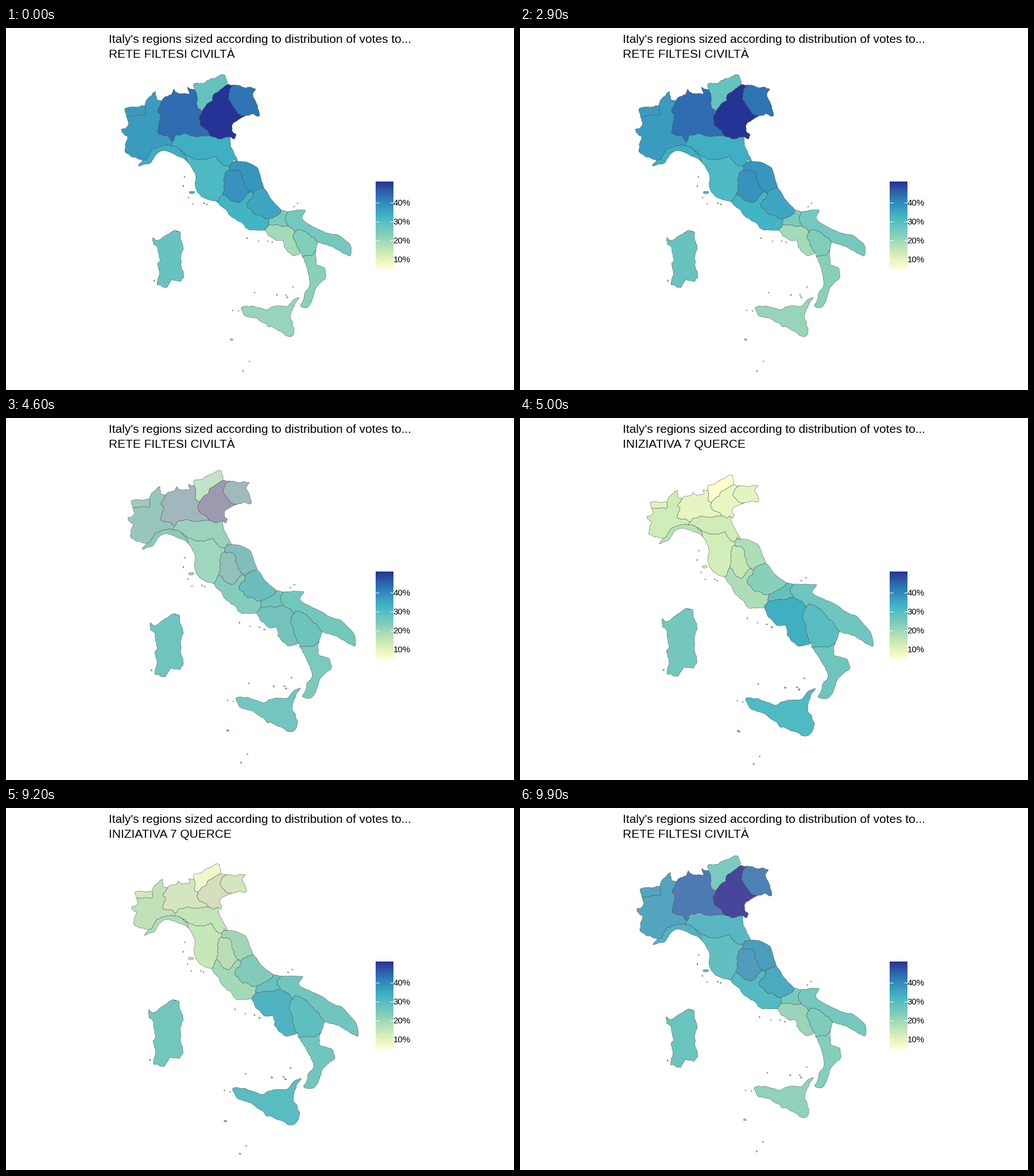
Animation, 885 px wide and 632 px high, one loop 10000 ms. Source, as a matplotlib script:

```python
import matplotlib.pyplot as plt
import numpy as np
from matplotlib.animation import FuncAnimation
from matplotlib.collections import PolyCollection
from matplotlib.colors import to_rgb

W, H, DPI = 885, 632, 100
LOW, HIGH = 5.2, 51.0
TITLE = "Italy's regions sized according to distribution of votes to..."
PARTIES = ("RETE FILTESI CIVILTÀ", "INIZIATIVA 7 QUERCE")
rng = np.random.default_rng(11)

# vote share of the two parties, in percent
SHARES = dict(
    vda=(37.2, 10.4), pie=(37.1, 13.3), lom=(44, 9.3), tre=(27.8, 5.2),
    ven=(51, 8.9), fri=(43.2, 9.6), lig=(34.2, 16.4), emi=(33.8, 12.9),
    tos=(31.5, 12.7), umb=(38.4, 14.6), mar=(38, 18), laz=(32.8, 17.9),
    abr=(35.4, 22.4), mol=(24.3, 28.5), cam=(19.2, 33.9), pug=(25.3, 26.3),
    bas=(23.3, 29.8), cal=(22.6, 26.7), sic=(20.8, 31.2), sar=(27.6, 25.7))

# points where borders meet
NODES = dict(
    P1=(242, 136), P2=(211, 157), P3=(272, 128), P4=(290, 199), P5=(288, 206),
    P6=(246, 229), L1=(304, 214), L2=(316, 234), E1=(357, 189), E2=(391, 190),
    E3=(389, 241), E4=(404, 233), T1=(329, 107), T2=(342, 146), T3=(386, 99),
    V1=(397, 99), V2=(417, 153), U1=(389, 248), U2=(378, 291), U3=(427, 285),
    M1=(430, 289), M2=(449, 279), Z1=(367, 303), Z2=(458, 334), Z3=(458, 344),
    Z4=(452, 353), O1=(480, 318), O2=(490, 321), O3=(491, 346), C1=(503, 357),
    C2=(514, 392), B1=(544, 374), B2=(540, 388), B3=(516, 399))

# pulls on the map sheet: x, y, dx, dy
ALPS = [(207, 142, 20, 6), (242, 136, 14, 11), (259, 111, 14, 15), (201, 177, 20, -5),
        (230, 241, 12, -21), (275, 215, 5, -22), (290, 199, 6, -17), (291, 106, 10, 23),
        (342, 146, -8, 2), (357, 189, -4, -18), (380, 82, -11, 18), (397, 99, -15, 19),
        (442, 152, -26, -7), (399, 194, -27, -19)]
SPINE = [(316, 234, 2, -27), (404, 233, -20, -22), (367, 303, -10, -25), (378, 291, -12, -30),
         (427, 285, -24, -23), (449, 279, -21, -26), (452, 353, -26, -22), (458, 334, -25, -25),
         (480, 318, -15, -30), (521, 318, -5, -27), (516, 331, -7, -27), (491, 346, -15, -33),
         (503, 357, -5, -26), (548, 352, 3, -28), (600, 380, 11, -4), (544, 374, 13, -1),
         (514, 392, -7, 1), (479, 370, -21, -9), (524, 417, -5, -2), (557, 436, 18, 1),
         (529, 441, 6, 2), (513, 484, 6, 2)]
SEA = [(410, 489, -17, 2), (511, 471, 4, 2), (502, 525, 11, 8), (498, 538, 6, 15),
       (447, 513, -7, 13), (465, 522, -2, 19), (294, 353, -4, -21), (256, 378, -9, -13),
       (309, 385, 0, -19), (303, 443, -2, -6), (266, 405, -9, -6), (502, 312, -12, -28),
       (393, 544, -12, 3), (413, 599, -6, 5)]


# ---- colour in Lab ----
M = np.array([[.4124, .3576, .1805], [.2126, .7152, .0722], [.0193, .1192, .9505]])
WHITE = M.sum(axis=1)


def rgb_to_lab(rgb):
    rgb = np.asarray(rgb, float)
    lin = np.where(rgb > .04045, ((rgb + .055) / 1.055) ** 2.4, rgb / 12.92)
    x = lin @ M.T / WHITE
    f = np.where(x > .008856, np.cbrt(x), 7.787 * x + 16 / 116)
    return np.stack([116 * f[..., 1] - 16, 500 * (f[..., 0] - f[..., 1]),
                     200 * (f[..., 1] - f[..., 2])], axis=-1)


def lab_to_rgb(lab):
    fy = (lab[..., 0] + 16) / 116
    f = np.stack([fy + lab[..., 1] / 500, fy, fy - lab[..., 2] / 200], axis=-1)
    x = np.where(f > .2069, f ** 3, (f - 16 / 116) / 7.787) * WHITE
    lin = np.clip(x @ np.linalg.inv(M).T, 0, 1)
    return np.where(lin > .0031308, 1.055 * lin ** (1 / 2.4) - .055, 12.92 * lin)


STOPS = rgb_to_lab([to_rgb(c) for c in (
    "#ffffcc", "#c7e9b4", "#7fcdbb", "#41b6c4", "#2c7fb8", "#253494")])


def scale_lab(share):
    t = (np.asarray(share, float) - LOW) / (HIGH - LOW) * 5
    return np.stack([np.interp(t, range(6), STOPS[:, k]) for k in range(3)], axis=-1)


# ---- thin-plate warp that follows the pulls ----
def kernel(p, q):
    r2 = ((p[:, None] - q[None]) ** 2).sum(axis=-1)
    return r2 * np.log(r2 + 1e-9)


def affine(p):
    return np.column_stack([np.ones(len(p)), p])


pulls = np.array(ALPS + SPINE + SEA, float)
pins, shift = pulls[:, :2], pulls[:, 2:]
A = affine(pins)
system = np.block([[kernel(pins, pins), A], [A.T, np.zeros((3, 3))]])
weights = np.linalg.solve(system, np.vstack([shift, np.zeros((3, 2))]))


def warp(p):
    return p + np.hstack([kernel(p, pins), affine(p)]) @ weights


# ---- borders and coasts ----
def rough(pts, amp):
    """Smooth curve through the points with a seeded fractal wobble."""
    p = np.array(pts, float)
    closed = np.allclose(p[0], p[-1])
    for _ in range(4):
        q = np.vstack([p[-2] if closed else p[0], p, p[1] if closed else p[-1]])
        mid = (9 * (q[1:-2] + q[2:-1]) - q[:-3] - q[3:]) / 16
        d = np.diff(p, axis=0)
        mid += np.clip(rng.normal(0, amp, (len(d), 1)), -.2, .2) * d[:, ::-1] * (-1, 1)
        out = np.empty((len(p) + len(mid), 2))
        out[::2], out[1::2] = p, mid
        p = out
    return p


arcs, shapes = [], []


def arc(keys, start, end, *via, amp=.09):
    arcs.append((keys.split(), rough([NODES[start], *via, NODES[end]], amp)))


def loop(key, *pts, amp=.08):
    shapes.append((key, rough([*pts, pts[0]], amp)))


def islet(key, x, y, rx, ry):
    a = np.arange(6) * np.pi / 3
    loop(key, *zip(x + rx * np.cos(a), y + ry * np.sin(a)))


def ring(key):
    """Join the arcs of a region end to end."""
    parts = [p for keys, p in arcs if key in keys]
    path = parts.pop(0)
    while parts:
        for i, p in enumerate(parts):
            if np.allclose(p[-1], path[-1]):
                p = p[::-1]
            if np.allclose(p[0], path[-1]):
                path = np.vstack([path, p[1:]])
                del parts[i]
                break
        else:
            break
    return path


# inland borders
arc("vda pie", "P1", "P2", (242, 152), (224, 154))
arc("pie lom", "P3", "P4", (264, 145), (269, 160), (264, 181), (278, 188))
arc("pie emi", "P4", "P5")
arc("pie lig", "P5", "P6", (264, 208), (251, 219))
arc("lom tre", "T1", "T2", (333, 120), (334, 139))
arc("lom ven", "T2", "E1", (337, 155), (341, 172))
arc("lom emi", "E1", "P4", (331, 190), (312, 184), (297, 187))
arc("tre ven", "T3", "T2", (371, 110), (358, 128))
arc("ven fri", "V1", "V2", (390, 110), (388, 125), (400, 142))
arc("ven emi", "E2", "E1")
arc("lig emi", "P5", "L1", (297, 207))
arc("lig tos", "L1", "L2")
arc("emi mar", "E4", "E3", (394, 235))
arc("emi tos", "E3", "L1", (375, 236), (364, 224), (340, 229))
arc("tos mar", "E3", "U1")
arc("tos umb", "U1", "U2", (380, 262), (380, 280))
arc("tos laz", "U2", "Z1")
arc("umb mar", "U1", "U3", (404, 249), (413, 267))
arc("umb laz", "U3", "U2", (416, 295), (402, 304))
arc("mar abr", "M2", "M1", (438, 282))
arc("mar laz", "M1", "U3")
arc("laz abr", "M1", "Z2", (429, 298), (420, 312), (436, 327))
arc("laz mol", "Z2", "Z3")
arc("laz cam", "Z3", "Z4")
arc("abr mol", "O1", "Z2", (472, 328))
arc("mol pug", "O2", "O3", (486, 331))
arc("mol cam", "O3", "Z3", (474, 344))
arc("cam pug", "O3", "C1")
arc("cam bas", "C1", "C2", (500, 366))
arc("pug bas", "B1", "C1", (528, 361), (520, 355))
arc("bas cal", "B2", "B3", (533, 397))

# outer frontier
arc("vda", "P2", "P1", (207, 142), (228, 138))
arc("pie", "P1", "P3", (247, 123), (260, 111), (262, 124))
arc("pie", "P6", "P2", (226, 226), (208, 210), (212, 190), (201, 177), (213, 169))
arc("lom", "P3", "T1", (276, 121), (288, 117), (292, 107), (301, 115), (319, 115), (316, 104))
arc("tre", "T1", "T3", (328, 97), (346, 96), (356, 89), (380, 82))
arc("ven", "T3", "V1")
arc("fri", "V1", "V2", (434, 106), (430, 118), (436, 131), (442, 152), (430, 150))

# coasts
arc("ven", "V2", "E2", (396, 166), (394, 180), (401, 187), (397, 194), amp=.06)
arc("lig", "L2", "P6", (296, 222), (275, 214), (260, 223), (249, 237), (231, 241), (236, 234),
    amp=.05)
arc("emi", "E2", "E4", (392, 208), amp=.03)
arc("tos", "Z1", "L2", (349, 298), (333, 286), (331, 265), (325, 247), amp=.05)
arc("mar", "E4", "M2", (419, 234), (438, 244), (444, 262), amp=.02)
arc("laz", "Z4", "Z1", (425, 353), (411, 340), (385, 319), amp=.04)
arc("abr", "M2", "O1", (462, 299), amp=.02)
arc("mol", "O1", "O2", amp=.03)
arc("cam", "C2", "Z4", (504, 397), (488, 386), (482, 371), (471, 371), (457, 362), amp=.06)
arc("pug", "O2", "B1", (521, 318), (516, 331), (530, 344), (560, 358), (578, 361), (600, 379),
    (599, 398), (583, 390), (566, 381), amp=.03)
arc("bas", "B1", "B2", amp=.03)
arc("bas", "B3", "C2", amp=.03)
arc("cal", "B2", "B3", (541, 413), (555, 419), (557, 436), (541, 452), (528, 485), (513, 484),
    (521, 462), (529, 441), (523, 414), amp=.04)

shapes += [(key, ring(key)) for key in SHARES if key not in ("sic", "sar")]

loop("sic", (410, 489), (423, 486), (432, 486), (453, 492), (489, 486), (511, 471), (496, 500),
     (502, 525), (498, 538), (482, 532), (465, 522), (456, 521), (437, 507), (417, 503), amp=.06)
loop("sar", (256, 366), (263, 371), (294, 353), (304, 367), (309, 385), (306, 420), (303, 443),
     (288, 440), (280, 453), (263, 448), (267, 425), (264, 411), (268, 404), (257, 378))

islet("tos", 324, 287, 5, 2.2)
islet("sic", 393, 544, 2.4, 1.5)
islet("none", 397, 232, 1.8, 1.5)
DOTS = dict(
    tos=[(311, 260), (309, 276), (318, 296), (326, 307), (345, 306), (350, 308)],
    laz=[(420, 367), (440, 372)], cam=[(456, 372), (464, 374)], pug=[(502, 312), (508, 306)],
    sic=[(433, 462), (472, 466), (488, 466), (490, 470), (500, 452), (395, 493), (405, 494),
         (424, 582), (413, 599)],
    sar=[(298, 355), (258, 441)])
for key, spots in DOTS.items():
    for x, y in spots:
        islet(key, x, y, *rng.uniform(.6, 1.3, 2))

first = [p for _, p in shapes]
second = [warp(p) for p in first]
blank = rgb_to_lab((1, 1, 1))
lab_a, lab_b = (np.array([scale_lab(SHARES[k][j]) if k in SHARES else blank
                          for k, _ in shapes]) for j in (0, 1))

# ---- stage ----
fig = plt.figure(figsize=(W / DPI, H / DPI), dpi=DPI, facecolor="white")
ax = fig.add_axes((0, 0, 1, 1))
ax.axis("off")


def px(n):
    return n * 72 / DPI


def label(x, y, text, size, va="baseline"):
    return ax.text(x, y, text, family="Liberation Sans", size=px(size), va=va)


land = PolyCollection(first, edgecolors="#454545", linewidths=px(.45))
ax.add_collection(land)

bar = lab_to_rgb(scale_lab(np.linspace(HIGH, LOW, 152)))[:, None]
ax.imshow(bar, extent=(644, 675, 420, 268), aspect="auto", interpolation="bilinear")
for v in (10, 20, 30, 40):
    y = 437.1 - 3.313 * v
    for x in (644, 669):
        ax.plot([x, x + 6], [y, y], color="white", lw=px(1), solid_capstyle="butt")
    label(674.5, y, f"{v}%", 15, "center_baseline")

label(179, 26.5, TITLE, 20.9)
party = label(179, 51.5, "", 20.9)
ax.set_xlim(0, W)
ax.set_ylim(H, 0)


def draw(i):
    t = np.interp(i, (41, 50, 91, 100), (0, 1, 1, 0))
    land.set_verts([a + (b - a) * t for a, b in zip(first, second)])
    land.set_facecolor(lab_to_rgb(lab_a + (lab_b - lab_a) * t))
    party.set_text(PARTIES[46 < i <= 96])
    return land, party


anim = FuncAnimation(fig, draw, frames=100, interval=100, repeat=True, repeat_delay=0)
plt.show()
```
